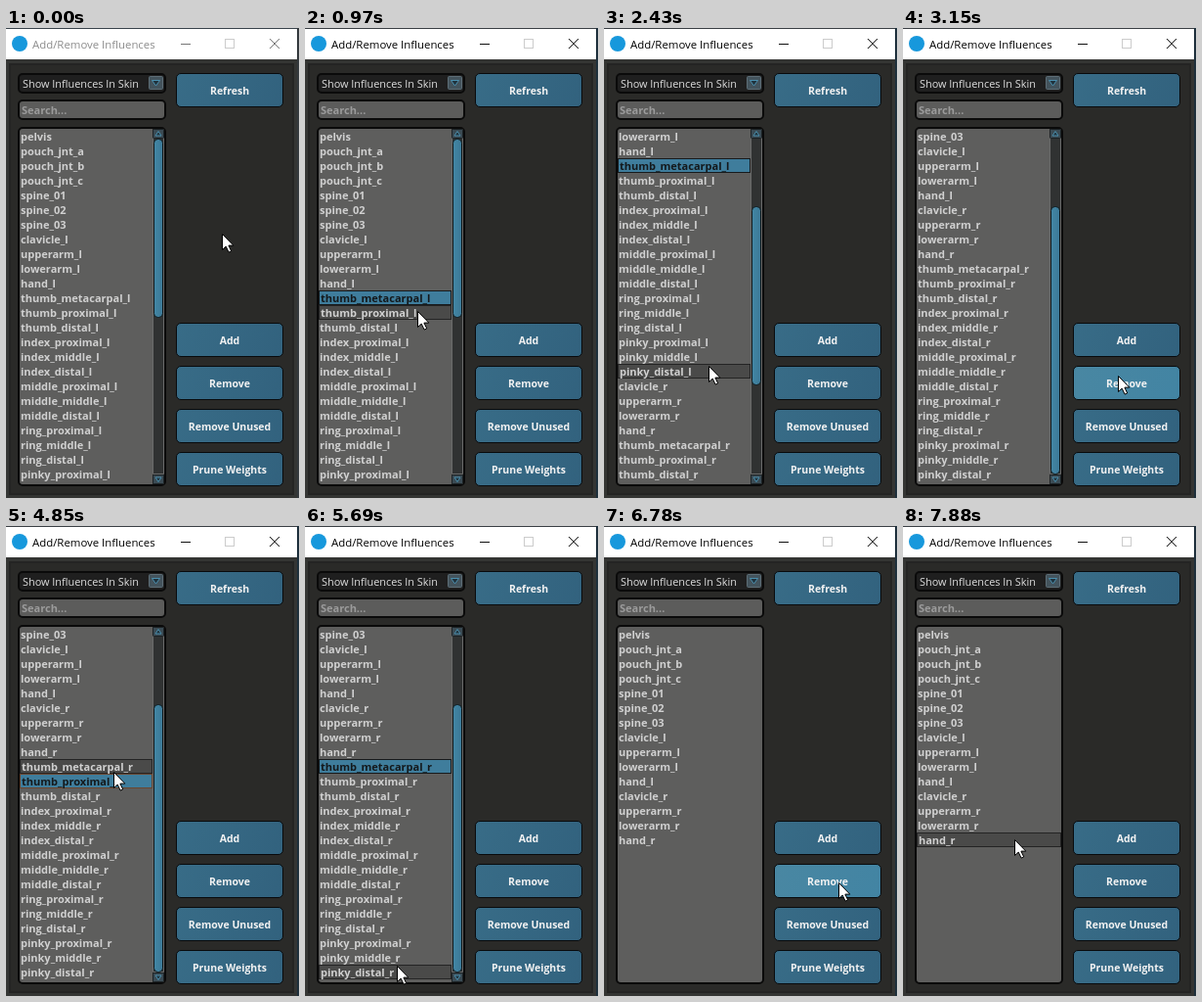
Write an HTML page with a canvas that moves like this. It is 300 px wide and 480 px high and loops after 8000 ms.

```html
<!DOCTYPE html>
<html lang="en">
<head>
<meta charset="utf-8">
<title>Add/Remove Influences</title>
<style>
  html, body { margin: 0; width: 100%; height: 100%; overflow: hidden; background: #2a2a28; }
  canvas { display: block; width: 300px; height: 480px; }
</style>
</head>
<body>
<canvas id="stage"></canvas>
<script>
const W = 300, H = 480, LOOP = 8000, TICK = 120;
const FONT = '"Open Sans", "Noto Sans", sans-serif';
const ROW_H = 15, LIST_TOP = 103, VISIBLE = 24;

const canvas = document.getElementById('stage');
const ratio = window.devicePixelRatio || 1;
canvas.width = W * ratio;
canvas.height = H * ratio;
const ctx = canvas.getContext('2d');
ctx.scale(ratio, ratio);

// Joint names
const arm = side => ['clavicle', 'upperarm', 'lowerarm', 'hand'].map(n => `${n}_${side}`);
const fingers = side => ['thumb', 'index', 'middle', 'ring', 'pinky'].flatMap(f =>
  [f === 'thumb' ? 'metacarpal' : 'proximal', f === 'thumb' ? 'proximal' : 'middle', 'distal']
    .map(part => `${f}_${part}_${side}`));
const spine = ['pelvis', 'pouch_jnt_a', 'pouch_jnt_b', 'pouch_jnt_c', 'spine_01', 'spine_02', 'spine_03'];
const trimmed = [...spine, ...arm('l'), ...arm('r')];
const withRight = [...trimmed, ...fingers('r')];
const everything = [...spine, ...arm('l'), ...fingers('l'), ...arm('r'), ...fingers('r')];

// List states: selection is an inclusive index range
const listSteps = [
  { at: 0, items: everything, scroll: 0 },
  { at: 720, selected: [11, 11] },
  { at: 1210, scroll: 3 },
  { at: 1580, scroll: 6 },
  { at: 1700, scroll: 9 },
  { at: 2550, selected: [11, 25] },
  { at: 3150, items: withRight, scroll: 6, selected: null },
  { at: 4610, selected: [16, 16], focus: '#b0693c' },
  { at: 4970, selected: [15, 15], focus: '#0b1014' },
  { at: 5940, selected: [15, 29] },
  { at: 6780, items: trimmed, scroll: 0, selected: null },
];

// Pointer moves: start time, number of ticks, destination
const moves = [
  [240, 3, 113, 272], [970, 2, 117, 305], [1950, 5, 107, 345], [2790, 2, 220, 355],
  [3770, 7, 110, 258], [4850, 1, 110, 251], [5090, 5, 97, 425], [5690, 1, 94, 449],
  [6060, 6, 240, 364], [6900, 4, 112, 320], [7880, 1, 114, 320],
];

const buttons = [['Refresh', 46], ['Add', 301], ['Remove', 345], ['Remove Unused', 389], ['Prune Weights', 433]];

const ease = p => (1 - Math.cos(Math.PI * p)) / 2;

function listAt(t) {
  return Object.assign({ focus: '#0b1014' }, ...listSteps.filter(s => s.at <= t));
}

function pointerAt(t) {
  let x = 221, y = 210;
  for (const [at, ticks, toX, toY] of moves) {
    if (t < at) break;
    const done = Math.min(ticks, Math.floor((t - at) / TICK) + 1);
    const p = ease(done / ticks);
    x += (toX - x) * p;
    y += (toY - y) * p;
  }
  return { x: Math.round(x), y: Math.round(y) };
}

function rect(x, y, w, h, fill) {
  ctx.fillStyle = fill;
  ctx.fillRect(x, y, w, h);
}

function box(x, y, w, h, radius, fill, edge, line = 1) {
  ctx.beginPath();
  ctx.roundRect(x + line / 2, y + line / 2, w - line, h - line, radius);
  ctx.fillStyle = fill;
  ctx.fill();
  ctx.strokeStyle = edge;
  ctx.lineWidth = line;
  ctx.stroke();
}

function label(text, x, y, color, font = 'bold 11px', align = 'left') {
  ctx.font = `${font} ${FONT}`;
  ctx.textAlign = align;
  ctx.fillStyle = color;
  ctx.fillText(text, x, y);
}

function poly(points, fill, edge) {
  ctx.beginPath();
  points.forEach(([x, y]) => ctx.lineTo(x, y));
  ctx.closePath();
  if (fill) { ctx.fillStyle = fill; ctx.fill(); }
  if (edge) { ctx.strokeStyle = edge; ctx.lineWidth = 1; ctx.stroke(); }
}

function blend(x, y, w, h, from, to) {
  const g = ctx.createLinearGradient(x, y, x + w, y + h);
  g.addColorStop(0, from);
  g.addColorStop(1, to);
  return g;
}

function drawWindow(active) {
  rect(0, 0, W, H, '#343533');
  rect(3, 36, 292, 441, '#242423');
  rect(5, 38, 288, 437, '#2a2a28');
  rect(0, 0, 298, 32, '#ffffff');
  rect(0, 0, W, 1, active ? '#3a3f44' : '#39434b');
  rect(298, 0, 2, H, active ? '#1d2f3b' : '#33383c');

  ctx.beginPath();
  ctx.arc(14, 16, 8, 0, 7);
  ctx.fillStyle = '#1798dc';
  ctx.fill();
  label('Add/Remove Influences', 27, 21, active ? '#000000' : '#8c8c8c', '11.4px');

  const ink = active ? '#111111' : '#777777';
  rect(179, 16, 10, 1, ink);
  ctx.lineWidth = 1;
  ctx.strokeStyle = '#cccccc';
  ctx.strokeRect(224.5, 11.5, 9, 9);
  ctx.strokeStyle = ink;
  ctx.beginPath();
  ctx.moveTo(270, 11); ctx.lineTo(280, 21);
  ctx.moveTo(280, 11); ctx.lineTo(270, 21);
  ctx.stroke();
}

function drawFields() {
  box(12, 46, 152, 21, 4, '#1f1f1f', '#0a0a0a', 2);
  label('Show Influences In Skin', 17, 61, '#dedede', '10.9px');
  box(146, 49, 15, 14, 1, '#43535c', '#5d6d76');
  poly([[149.5, 53.5], [157.5, 53.5], [153.5, 59]], '#20323c', '#4b8fae');
  box(12, 73, 152, 21, 4, '#5c5c5b', '#0a0a0a', 2);
  label('Search...', 16, 88, '#9b9b9b');
}

function drawButtons(pointer) {
  for (const [text, y] of buttons) {
    const hot = pointer.x >= 174 && pointer.x < 284 && pointer.y >= y && pointer.y < y + 35;
    const fill = hot ? blend(174, y, 110, 35, '#4987a2', '#4284a3') : blend(174, y, 110, 35, '#386c87', '#32627e');
    box(174, y, 110, 35, 4.5, fill, '#080a0c');
    label(text, 229, y + 22, '#f2f2f2', 'bold 10.5px', 'center');
  }
}

function drawScrollbar({ items, scroll }) {
  rect(150, LIST_TOP, 12, 363, '#232424');
  box(150, 112, 12, 344, 0, '#303232', '#6a6b6b');
  box(150, 103, 12, 10, 1, '#3b4b54', '#1c2225');
  box(150, 456, 12, 10, 1, '#3b4b54', '#1c2225');
  poly([[153, 110], [159, 110], [156, 105.5]], '#20323c', '#4b8fae');
  poly([[153, 459], [159, 459], [156, 463.5]], '#20323c', '#4b8fae');
  const unit = 343 / items.length;
  box(151, Math.round(113 + scroll * unit), 10, Math.round(VISIBLE * unit), 4,
    blend(151, 0, 10, 0, '#4387a5', '#3b7896'), '#101719');
}

function drawList(list, pointer) {
  const { items, scroll, selected, focus } = list;
  const scrolls = items.length > VISIBLE;
  const right = scrolls ? 150 : 162;
  const over = pointer.x >= 14 && pointer.x < right ? Math.floor((pointer.y - LIST_TOP) / ROW_H) : -1;

  box(12, 101, 152, 367, 4, '#5e5e5d', '#0a0a0a', 2);
  items.slice(scroll, scroll + VISIBLE).forEach((name, row) => {
    const index = row + scroll, y = LIST_TOP + row * ROW_H;
    const chosen = selected && index >= selected[0] && index <= selected[1];
    const outline = (color, dash = []) => {
      ctx.setLineDash(dash);
      ctx.lineWidth = 1;
      ctx.strokeStyle = color;
      ctx.strokeRect(14.5, y + 0.5, right - 15, ROW_H - 1);
      ctx.setLineDash([]);
    };
    const marked = chosen || row === over;
    if (marked) {
      rect(14, y, right - 14, ROW_H, chosen ? '#3f7d9c' : '#4a4a49');
      outline('#242424');
      if (chosen && index === selected[1]) outline(focus, [1, 1]);
    }
    label(name, marked ? 16 : 15, y + 12, chosen ? '#14191c' : '#d0d0d0');
  });
  if (scrolls) drawScrollbar(list);
}

function drawPointer({ x, y }) {
  const outline = [[0, 0], [0, 16], [3.7, 12.6], [6.6, 18.6], [9.2, 17.4], [6.4, 11.6], [11.3, 11.6]];
  poly(outline.map(([dx, dy]) => [x + 0.5 + dx, y + 0.5 + dy]), '#ffffff', '#000000');
}

function draw(t) {
  const list = listAt(t), pointer = pointerAt(t);
  drawWindow(t >= 720);
  drawFields();
  drawButtons(pointer);
  drawList(list, pointer);
  drawPointer(pointer);
}

const start = performance.now();
function frame() {
  draw((performance.now() - start) % LOOP);
  requestAnimationFrame(frame);
}
frame();
</script>
</body>
</html>
```
